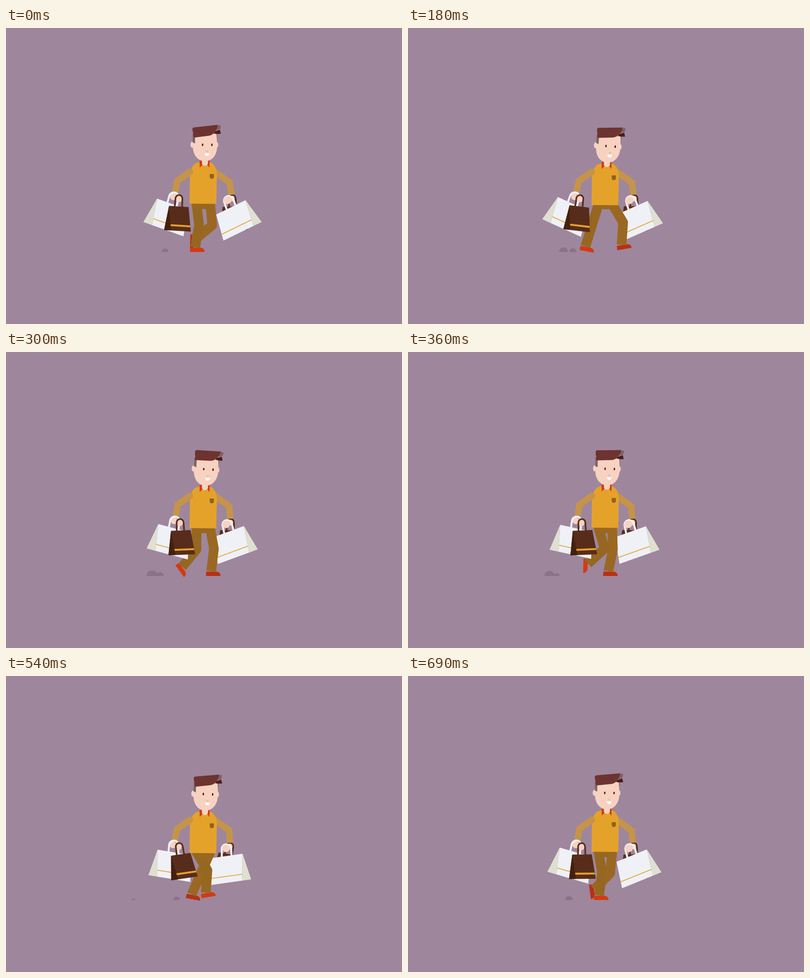
These frames come from a looping animation (800 by 600 pixels, 0.72 s). An HTML page with a canvas:

```html
<!DOCTYPE html>
<html lang="en">
<head>
<meta charset="utf-8">
<title>Shopper walking</title>
<style>
html, body { margin: 0; width: 100%; height: 100%; overflow: hidden; background: #9e869d; }
canvas { display: block; }
</style>
</head>
<body>
<canvas id="stage" width="800" height="600"></canvas>
<script>
const ctx = document.getElementById('stage').getContext('2d');
const LOOP = 720, STEP = 30, GROUND = 454;
const HIP_Y = 357, THIGH = 43, SHIN = 45.5, LEG_WIDTH = 19.5;
const LAND = 545, LIFT = 230;
const BACKDROP = '#9e869d', SKIN = '#f7d2c1', SHIRT = '#e5a22a', SLEEVE = '#c5944a';
const RED = '#d33a12', BROWN = '#582c1a', WHITE = '#eff1f6';

const rad = deg => deg * Math.PI / 180;
const mod = (n, m) => (n % m + m) % m;
const bell = (t, centre, width) => Math.exp(-(((t - centre) / width) ** 2));

// A sway with one slow swing per loop and one per step; phases in degrees
function wave(t, mean, slow, slowPeak, quick, quickPeak) {
  const angle = 360 * t / LOOP;
  return mean + slow * Math.cos(rad(angle - slowPeak)) + quick * Math.cos(2 * rad(angle - quickPeak));
}

function fill(path, color) {
  ctx.fillStyle = color;
  ctx.fill(new Path2D(path));
}

function stroke(path, color, width, join = 'miter', cap = 'butt') {
  Object.assign(ctx, { strokeStyle: color, lineWidth: width, lineJoin: join, lineCap: cap });
  ctx.stroke(new Path2D(path));
}

function oval(x, y, rx, ry, color) {
  ctx.fillStyle = color;
  ctx.beginPath();
  ctx.ellipse(x, y, rx, ry, 0, 0, 2 * Math.PI);
  ctx.fill();
}

function placed(x, y, deg, draw, flip = 1) {
  ctx.save();
  ctx.translate(x, y);
  ctx.rotate(rad(deg));
  ctx.scale(flip, 1);
  draw();
  ctx.restore();
}

// A dust puff drifts left while it swells and shrinks
function drawPuff(t, birth, life, x, speed, size) {
  const age = mod(t - birth, LOOP);
  if (age >= life) return;
  ctx.fillStyle = '#8b728b';
  ctx.beginPath();
  ctx.arc(x - speed * age, GROUND, size * Math.sin(Math.PI * (age / life) ** 0.8), Math.PI, 0);
  ctx.fill();
}

function whiteBag() {
  fill('M-31 20L35 20L45 74L-22.5 74Z', WHITE);
  fill('M-31 20L-22.5 74L-41 74Z', '#dfe0d1');
  stroke('M-24.5 61L42.7 61', SHIRT, 1.6);
  stroke('M-8.5 21L-9.5 6A9.5 9.5 0 0 1 9.5 6L11.5 21', WHITE, 4);
}

function brownBag() {
  fill('M-19 24L20.5 24L28 73.5L-26 73.5Z', BROWN);
  fill('M-19 24L-12 73.5L-26 73.5Z', '#43200f');
  fill('M-13.6 61L26.1 61L26.7 64.8L-13.2 64.8Z', SHIRT);
  stroke('M-7.5 25L-7 8A7 7 0 0 1 7 8L7.5 25', BROWN, 3.2);
}

// Foot offset, height and tilt: a steady slide on the ground, then a swing forward
function footPose(t) {
  const swing = (t - LIFT) / (LAND - LIFT);
  const inAir = swing > 0 && swing < 1;
  const slide = mod(t - LAND, LOOP) / (LOOP - LAND + LIFT);
  return {
    offset: inAir ? 53 * swing ** 1.7 - 20 : 33 - 53 * slide,
    height: 5 * bell(t, 235, 55) + 4 * bell(t, 540, 35) + (inAir ? 18.5 * Math.sin(Math.PI * swing ** 1.3) : 0),
    tilt: 92 * bell(t, 355, 75) + 12 * bell(t, 200, 50) - 10 * bell(t, 540, 45)
  };
}

function drawLeg(t, hipX, footX, stride, cloth, leather) {
  const foot = footPose(mod(t, LOOP));
  const ax = footX + stride * foot.offset, ay = 444.5 - foot.height;

  // The knee bends forward to fit between hip and ankle
  const dx = ax - hipX, dy = ay - HIP_Y, reach = Math.hypot(dx, dy);
  const along = (THIGH ** 2 - SHIN ** 2 + reach ** 2) / (2 * reach);
  const bend = Math.sqrt(Math.max(0, THIGH ** 2 - along ** 2));
  const kx = hipX + (dx * along + dy * bend) / reach;
  const ky = HIP_Y + (dy * along - dx * bend) / reach;

  placed(ax, ay, foot.tilt, () => fill('M-10 .8L10 .8C15 .8 19 4 19 9.5L-10.5 9.5Z', leather));
  stroke(`M${hipX} ${HIP_Y}L${kx} ${ky}L${ax} ${ay}`, cloth, LEG_WIDTH, 'round');
}

function drawHair() {
  fill('M-26 -9Q-26 -13 -22 -13L26 -13Q25 -5 20 -1C16 4 12 7 5 7L-25 7.5Z', '#6d3330');
  fill('M26 -12.5L32 -11L29.5 -4L19.5 -1Q25 -5 26 -12.5Z', '#7b625f');
  fill('M19 0L29 -2.5L30.5 5.5L24 5.5L16 4Z', '#4b1d1c');
}

function drawHead(hairTilt) {
  ctx.translate(-402, -275);
  oval(376.5, 236.5, 3.7, 6.3, SKIN);
  oval(426.5, 236.5, 2.3, 5.5, SKIN);
  fill('M377.5 210L426.5 210L426.5 240C426.5 258 416 270 402 270C388 270 377.5 258 377.5 240Z', SKIN);
  fill('M377 214L382 214L382 234L377 232Z', '#7d6664');
  fill('M425 212L427 212L427 234Z', '#7d6664');
  oval(397.2, 236.7, 1.5, 2.7, '#451713');
  oval(416, 236.7, 1.5, 2.7, '#451713');
  stroke('M403.5 248.5L406 250.8L408.5 248.5', '#e3a994', 1.1);
  fill('M401.2 254L411 254C410.5 261 402 261 401.2 254Z', '#fff');
  placed(403.5, 212, hairTilt, drawHair);
}

function drawTorso() {
  fill('M370.7 356L371.5 300C372 284 379 272.5 391 272L412 272C419 273.5 426 283 426 298L424.7 356.5Z', SHIRT);
  fill('M411.5 296L420 296L420 301.5Q419.5 305.8 415.8 305.8Q412 305.8 411.5 301.5Z', '#8f621d');
  fill('M391 269.5L396 267L397 277L391.5 283Z', RED);
  fill('M411.3 269.5L407 267L406.5 277L411 283Z', RED);
  fill('M395.8 260L408 260L408 273.5C408 281 395.8 281 395.8 273.5Z', SKIN);
}

// Bags on the far side hang behind the body
function drawRightArm(t) {
  const x = wave(t, 446, 2, 52, 1.2, 45);
  oval(x + 8, 344.5, 6.5, 7, SKIN);
  placed(x + 9, 337.3, wave(t, 1.4, 5.2, 241, 3.3, 103), brownBag, -1);
  stroke(`M420 290L${451.5 + (x - 446) * 0.3} 313L${x + 8} 338`, SLEEVE, 13);
  placed(x, 344.7, wave(t, -19.4, 8.6, 248, 4.2, 108), whiteBag, -1);
  oval(x, 349.5, 7.8, 7.5, SKIN);
}

function drawLeftArm(t) {
  const x = wave(t, 340.6, 0.6, 215, 1.8, -29);
  oval(x - 3, 342, 6.5, 7, SKIN);
  oval(371.5, 291.5, 6.5, 6.5, SLEEVE);
  stroke(`M371.5 291.5L${346 + (x - 341) * 0.3} 310L${x + 0.4} 333`, SLEEVE, 13);
  placed(x, 337.3, wave(t, 16.5, 8.5, 65, 2.5, 50), whiteBag);
  oval(x + 7.7, 345.8, 7.2, 7.4, SKIN);
  placed(x + 8.8, 337.7, wave(t, -0.2, 8.1, 68, 4, 40), brownBag);
}

function draw(t) {
  ctx.fillStyle = BACKDROP;
  ctx.fillRect(0, 0, 800, 600);

  drawPuff(t, 60, 540, 333, 0.157, 11.3);
  drawPuff(t, 75, 390, 352, 0.18, 8.5);
  drawPuff(t, 445, 435, 357, 0.13, 8.5);

  drawRightArm(t);
  drawLeg(t + LOOP / 2, 412.5, 392, 1.25, '#9a6822', '#b83014');
  drawLeg(t, 385, 372, 1, '#956720', RED);
  stroke('M385 357.5L412 357.5', '#986821', LEG_WIDTH, 'round', 'round');

  ctx.save();
  ctx.translate(0, wave(t, 1.4, 0, 0, 1.4, 95));
  drawTorso();
  placed(402, 275, wave(t, 1.9, 1.2, 130, 1.7, 112), () => drawHead(wave(t, -5, 2.5, 152, 2.9, -37)));
  ctx.restore();

  drawLeftArm(t);
}

const start = performance.now();
function frame(now) {
  const elapsed = Math.max(0, now - start);
  draw(Math.floor(elapsed % LOOP / STEP) * STEP);
  requestAnimationFrame(frame);
}
frame(start);
</script>
</body>
</html>
```
